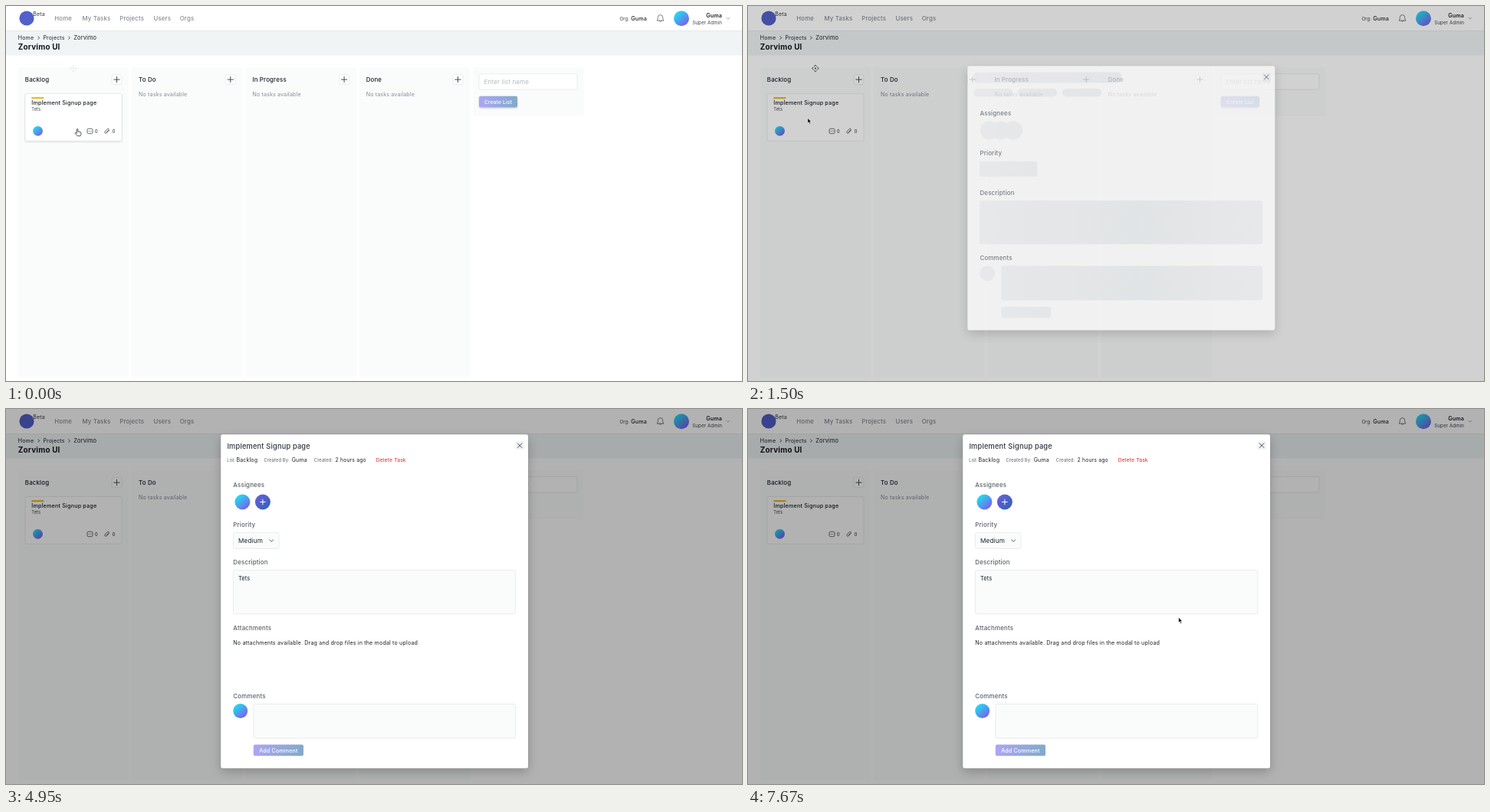
These frames come from a looping animation (960 px wide and 490 px high, 8 s). An HTML page:

```html
<!DOCTYPE html>
<html lang="en">
<head>
<meta charset="utf-8">
<title>Task board</title>
<style>
html, body { margin: 0; width: 100%; height: 100%; overflow: hidden; background: #fff; }
svg { display: block; width: 100vw; height: 100vh; }
text { font-family: Inter, "Open Sans", sans-serif; letter-spacing: .02em; white-space: pre; }
.files text { letter-spacing: 0; }
</style>
</head>
<body>
<svg id="stage" viewBox="0 0 960 490">
  <defs>
    <linearGradient id="avatar" x1=".15" y1=".1" x2=".85" y2=".9">
      <stop offset=".1" stop-color="#25d5f2"/><stop offset="1" stop-color="#7d5eea"/>
    </linearGradient>
    <linearGradient id="button"><stop stop-color="#aba6f3"/><stop offset="1" stop-color="#82a9cb"/></linearGradient>
    <linearGradient id="add" x2="1" y2="1"><stop stop-color="#6a5fe0"/><stop offset="1" stop-color="#2f62b0"/></linearGradient>
    <linearGradient id="shimmer" gradientUnits="userSpaceOnUse" x1="0" x2="400" y1="0" y2="0">
      <stop stop-color="#f1f2f4"/><stop offset=".5" stop-color="#eaedef"/><stop offset="1" stop-color="#f1f2f4"/>
    </linearGradient>
    <filter id="soft" x="-20%" y="-20%" width="140%" height="150%">
      <feDropShadow dx="0" dy="1" stdDeviation="1.2" flood-opacity=".2"/>
    </filter>
    <filter id="deep" x="-20%" y="-20%" width="140%" height="140%">
      <feDropShadow dx="0" dy="5" stdDeviation="7" flood-opacity=".22"/>
    </filter>
  </defs>
</svg>
<script>
const LOOP = 8000;
const INK = '#1b2128', GREY = '#858b94', LABEL = '#5a616b', EDGE = '#e4e7e9', PANEL = '#fafcfc';
const APP = 'Zorvimo', USER = 'Guma';

// Text is placed by the vertical middle of its capitals.
const text = (x, y, str, size, fill = INK, weight = 400, anchor = 'start') =>
  `<text x="${x}" y="${y + size * .36}" font-size="${size}" fill="${fill}" font-weight="${weight}" text-anchor="${anchor}">${str}</text>`;
const rect = (x, y, w, h, fill, r = 0, extra = '') =>
  `<rect x="${x}" y="${y}" width="${w}" height="${h}" rx="${r}" fill="${fill}" ${extra}/>`;
const box = (x, y, w, h, fill = PANEL, r = 2) => rect(x, y, w, h, fill, r, `stroke="${EDGE}" stroke-width=".8"`);
const disc = (x, y, r, fill = 'url(#avatar)', extra = '') => `<circle cx="${x}" cy="${y}" r="${r}" fill="${fill}" ${extra}/>`;
const line = (d, color = INK, width = .9, extra = '') =>
  `<path d="${d}" fill="none" stroke="${color}" stroke-width="${width}" stroke-linecap="round" stroke-linejoin="round" ${extra}/>`;
const plus = (x, y, r, color, width) => line(`M${x - r} ${y}h${2 * r}M${x} ${y - r}v${2 * r}`, color, width);
const group = (id, body, extra = '') => `<g id="${id}" ${extra}>${body}</g>`;

function header() {
  const nav = [['Home', 63.3], ['My Tasks', 99.5], ['Projects', 148.2], ['Users', 192.5], ['Orgs', 226.7]];
  return rect(0, 0, 960, 33, '#fff') + rect(0, 32.3, 960, 32.2, '#f0f4f5') + rect(0, 32, 960, .8, '#e3e7e8') +
    disc(27, 16, 9.6, '#5260c9') + text(35.3, 10.5, 'Beta', 7.1, '#333b45') +
    nav.map(([name, x]) => text(x, 16.2, name, 7.85, GREY, 500)).join('') +
    text(800.5, 16.5, 'Org:', 6, '#3c434c') + text(836, 16.4, USER, 7.2, INK, 500, 'end') +
    line('M849.3 18.8c1.2-1.2.9-2.6 1-4a3.2 3.2 0 0 1 6.4 0c.1 1.400-.2 2.800 1 4zM852.2 19.300a1.400 1.400 0 0 0 2.700 0', '#59606a', .8) +
    disc(881, 16.2, 10) + text(934, 12.6, USER, 7.1, INK, 600, 'end') +
    text(934, 21.400, 'Super Admin', 6.15, '#3c434c', 400, 'end') +
    line('M940 15.400l1.800 1.700 1.800-1.700', '#8a9098', .8) +
    text(15.8, 41.6, 'Home', 7.1) + text(48.5, 41.6, 'Projects', 7) + text(88.3, 41.6, APP, 7.4) +
    line('M42 39.900l1.600 1.700-1.600 1.700M81.700 39.900l1.600 1.700-1.600 1.700', INK, .8) +
    text(15.8, 53.6, APP + ' UI', 9.9, '#12171d', 700);
}

function board() {
  const lists = ['Backlog', 'To Do', 'In Progress', 'Done'].map((name, i) => {
    const x = 15.8 + i * 148.3;
    return rect(x, 80, 144.2, 405.5, PANEL, 2) + text(x + 9, 96.2, name, 7.9, INK, 500) +
      box(x + 122.300, 89.700, 12.800, 12.800, '#fff') + plus(x + 128.700, 96.100, 3.700, '#333a43', .9) +
      (i ? text(x + 9, 115.8, 'No tasks available', 7.1, GREY) : '');
  }).join('');
  return lists + rect(609, 80, 144.5, 64, PANEL, 2) + box(617, 88.700, 128, 20.500, '#fff') +
    text(623.500, 99, 'Enter list name', 8.05, '#b4b9c0') +
    rect(617, 117.700, 50, 14.800, 'url(#button)', 2, 'filter="url(#soft)"') +
    text(642, 125.300, 'Create List', 6.7, '#fff', 500, 'middle');
}

function card() {
  return rect(25, 114.500, 126, 61.800, '#fff', 2, 'id="hover" filter="url(#soft)"') + box(25, 114.500, 126, 61.800, '#fff') +
    rect(33.300, 119.200, 16, 2, '#eab30b') + text(33.300, 126.500, 'Implement Signup page', 7.25, INK, 500) +
    text(33.300, 135.200, 'Tets', 5.7, '#3c434c') + disc(41.500, 163.300, 6.400) +
    rect(106, 160.300, 7, 6.400, 'none', 1.600, 'stroke="#444b54" stroke-width=".8"') +
    line('M107.900 163.500h.1M109.500 163.500h.1M111.100 163.500h.1', '#444b54', .8) +
    text(116, 163.700, '0', 5.700) + text(138.700, 163.700, '0', 5.700) +
    line('M134.500 162.300l-3.300 3.600a1.400 1.400 0 0 1-2-2l3.200-3.400a1 1 0 0 1 1.500 1.400l-2.900 3', '#444b54', .8);
}

function moveIcon() {
  return disc(0, 0, 5, '#fff') + disc(0, 0, .9, INK) +
    [0, 90, 180, 270].map(a => line('M-1.500-2.700L0-4.200 1.500-2.700', INK, .9, `transform="rotate(${a})"`)).join('');
}

const modalBack = (y, h) => rect(280.300, y, 400.700, h, '#fff', 2.500, 'filter="url(#deep)"') +
  rect(664.500, y + 8.800, 11.200, 11.200, '#f1f3f4', 2) +
  line(`M667.300 ${y + 11.600}l5.600 5.600m0-5.600l-5.600 5.600`, '#333a43', .9);
const label = (y, name) => text(296.300, y, name, 7.950, LABEL, 500);

function skeleton() {
  const bone = (x, y, w, h, r = 3) => rect(x, y, w, h, 'url(#shimmer)', r);
  return modalBack(78.500, 345) + bone(288, 86.500, 193, 14, 5) +
    [288, 346, 404].map(x => bone(x, 108, 51, 10.500, 5)).join('') +
    label(140.400, 'Assignees') + [308.500, 323.500, 340].map(x => disc(x, 162.500, 12, 'url(#shimmer)')).join('') +
    label(192.300, 'Priority') + bone(296, 203, 75, 20) +
    label(244.200, 'Description') + bone(296, 254.300, 369, 57) +
    label(329.300, 'Comments') + disc(306, 349.500, 10, 'url(#shimmer)') +
    bone(324, 339.500, 341, 45) + bone(324, 393, 65, 14.500);
}

function details() {
  return text(288.400, 48.200, 'Implement Signup page', 9.250, '#30373f', 500) +
    text(288.300, 67, 'List:', 5.500, LABEL) + text(300.500, 66.700, 'Backlog', 7.050) +
    text(336.500, 67, 'Created By:', 5.800, LABEL) + text(372.700, 66.700, USER, 7.050) +
    text(401.800, 67, 'Created:', 5.800, LABEL) + text(429.500, 66.700, '2 hours ago', 6.900) +
    text(482.700, 66.700, 'Delete Task', 6.800, '#e02424') +
    label(99.400, 'Assignees') + disc(308.400, 121.500, 10) + disc(334.900, 121.500, 10, 'url(#add)') + plus(334.900, 121.500, 3.300, '#fff', 1) +
    label(151.400, 'Priority') + box(296.500, 161.700, 59.500, 20.600) + text(302.900, 172, 'Medium', 8.200) +
    line('M343.700 170.900l2.500 2.400 2.500-2.400', '#444b54', .9) +
    label(200.600, 'Description') + box(296.500, 210.700, 368.300, 57) + text(302.900, 221.300, 'Tets', 7.500) +
    label(285.800, 'Attachments') + text(296.300, 305.200, 'No attachments available. Drag and drop files in the modal to upload', 7.170) +
    label(375, 'Comments') + disc(305.700, 394.500, 9.500) + box(323, 385.500, 341.800, 44.600) +
    rect(322.800, 438.400, 65.200, 14.900, 'url(#button)', 2) + text(355.400, 446, 'Add Comment', 7.150, '#fff', 500, 'middle');
}

function dropZone() {
  return rect(304.800, 57.800, 352, 387, 'none', 3, 'stroke="#5148d6" stroke-width="1.300" stroke-dasharray="3.800 2.200"') +
    text(480.600, 246.200, 'Drop Files Here', 7.650, INK, 400, 'middle') +
    text(480.600, 257.600, 'Supported formats: jpg, png, pdf, txt, csv', 6.830, '#3c434c', 400, 'middle');
}

// Drawn around the pointer tip.
function dragged() {
  const files = [[APP.toLowerCase() + '.jpg', 42, '#7d78e0'], ['alert-overview.png', 68, '#8d9299'], ['river-cabin.png', 54, '#d9dde2']];
  return files.map(([name, w, tint], i) => {
    const y = -14 + i * 10;
    return rect(-67.500, y - 2.800, 7, 5.600, '#eef0f3', 1) + rect(-66.500, y - 1.300, 5, 2.600, tint) +
      rect(-59.500, y - 4, w, 8.200, '#1b6cda', 2) + text(-57, y + .1, name, 6.400, '#fff', 500);
  }).join('') +
    disc(21, 9.800, 4.600, '#e5352f') + text(21, 9.900, '3', 6.500, '#fff', 600, 'middle') +
    disc(.5, .8, 18.400, 'none', 'stroke="#0b0b0d" stroke-width="1.700"') +
    disc(5, 11, 4.800, '#2ba52b', 'stroke="#fff" stroke-width=".5"') + plus(5, 11, 2.500, '#fff', 1.500);
}

const shape = (d, fill, stroke) => `<path d="${d}" fill="${fill}" stroke="${stroke}" stroke-width=".7" stroke-linejoin="round"/>`;
const pointers = {
  arrow: shape('M0 0V7L1.600 5.600 2.700 8.200 4 7.600 2.900 5.100H5Z', '#000', '#fff'),
  hand: shape('M-.6 5.500V.6a.8.8 0 0 1 1.600 0V3.300l3 .5q1.200.3 1.100 1.500L4.700 7.600 4.200 9H.3L-2.700 5.700q-.2-1.200 1-.9Z', '#fff', '#111'),
  beam: line('M-1.600-4.500Q0-4.500 0-3.500V3.500Q0 4.500-1.600 4.500M1.600-4.500Q0-4.500 0-3.500M0 3.500Q0 4.500 1.600 4.500M-1 1.500h2', '#111', .9)
};

const stage = document.getElementById('stage');
stage.insertAdjacentHTML('beforeend',
  header() + board() + card() + group('handle', moveIcon(), 'transform="translate(87.900 81.500)"') +
  rect(0, 0, 960, 490, '#000', 0, 'id="shade"') + group('loading', skeleton()) +
  group('modal', modalBack(33.300, 436) + group('details', details()) + group('drop', dropZone())) +
  group('files', dragged(), 'class="files"') +
  Object.entries(pointers).map(([id, body]) => group(id, body)).join(''));

const el = id => document.getElementById(id);
const show = (id, on) => el(id).setAttribute('display', on ? 'inline' : 'none');
const fade = (id, a) => el(id).setAttribute('opacity', a);
const move = (id, x, y) => el(id).setAttribute('transform', `translate(${x} ${y})`);
const ramp = (t, start, length) => Math.min(1, Math.max(0, (t - start) / length));
const smooth = p => p * p * (3 - 2 * p);

// time, x, y and the easing used to arrive there
const linear = p => p;
const path = [
  [0, 92.900, 160.800], [280, 77.800, 146.300, smooth], [2400, 77.800, 146.300], [3200, 385, 304, smooth],
  [3620, 433.400, 306], [4030, 478, 313], [4060, 478, 313], [4250, 890, 66], [4290, 985, 20],
  [6230, 985, 60], [6500, 478.500, 128.200], [6830, 525, 240, smooth], [7400, 525, 240],
  [7670, 561.600, 272.200, smooth], [LOOP, 561.600, 272.200]
];
function pointerAt(t) {
  const i = path.findIndex(k => k[0] > t);
  const [t0, x0, y0] = path[i - 1], [t1, x1, y1, ease = linear] = path[i];
  const p = ease((t - t0) / (t1 - t0));
  return [x0 + (x1 - x0) * p, y0 + (y1 - y0) * p];
}

function draw(t) {
  const opening = t >= 1400, loaded = t >= 1930;
  const dropping = t >= 6290 && t < 7000;
  const [x, y] = pointerAt(t);

  show('hover', t < 1400);
  show('handle', t < 2420);
  fade('handle', .12 + .88 * ramp(t, 20, 250));
  fade('shade', .3 * ramp(t, 1397, 173));

  show('loading', opening && !loaded);
  fade('loading', ramp(t, 1400, 140));
  move('loading', 20 * (1 - smooth(ramp(t, 1400, 160))), 0);
  el('shimmer').setAttribute('gradientTransform', `translate(${300 + (t - 1500) * .5})`);

  show('modal', loaded);
  show('details', !dropping);
  show('drop', dropping);

  const overText = loaded && x > 296 && x < 540 && Math.abs(y - 305) < 5;
  const kind = t < 1370 ? 'hand' : overText ? 'beam' : 'arrow';
  for (const id in pointers) {
    show(id, id === kind);
    move(id, x, y);
  }
  show('files', t >= 6230 && t < 7000);
  move('files', x, y);
}

(function tick() {
  draw(performance.now() % LOOP);
  requestAnimationFrame(tick);
})();
</script>
</body>
</html>
```
